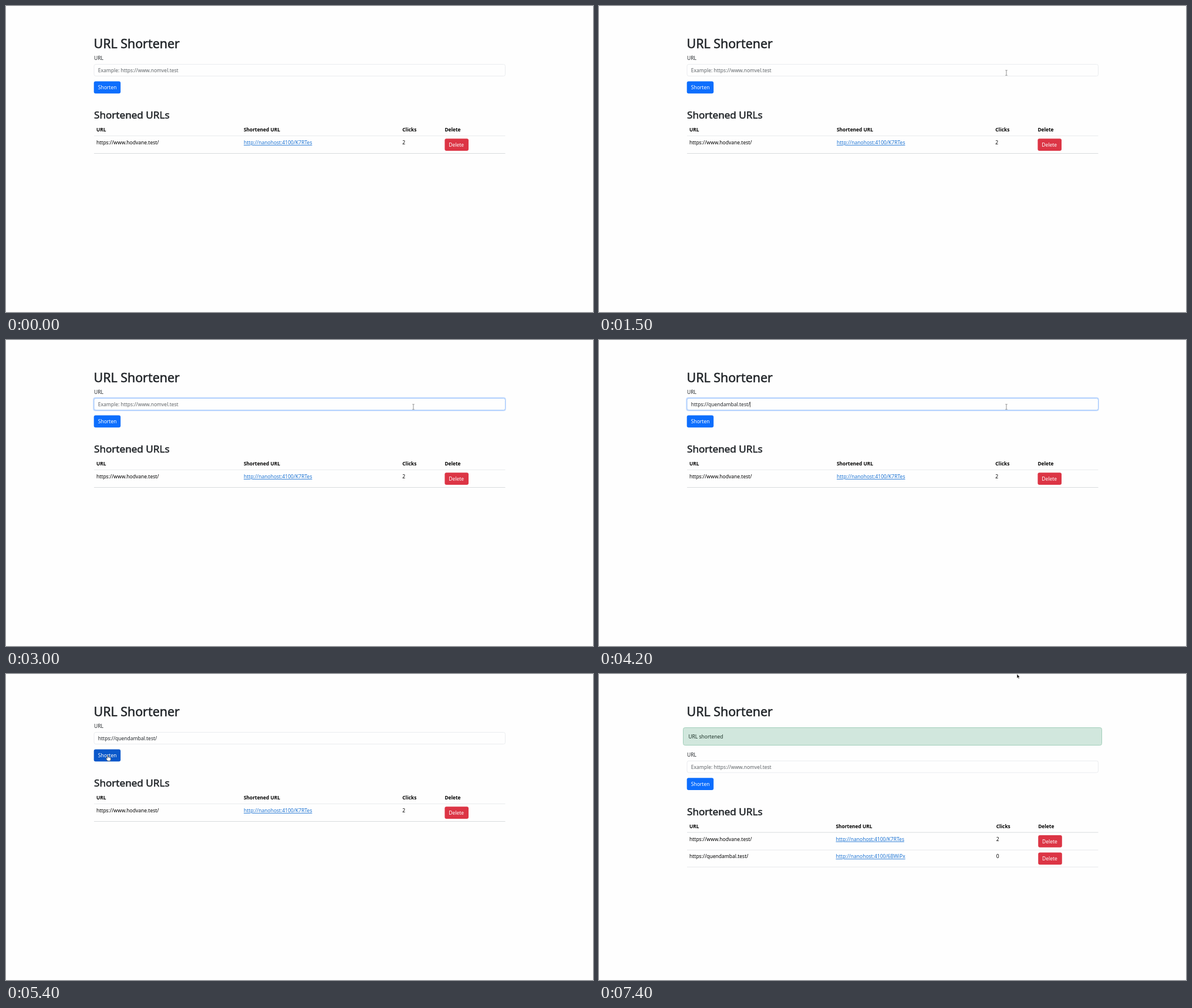
These frames come from a looping animation (1000 px wide and 522 px high, 8 s). An HTML page:

```html
<!DOCTYPE html>
<html lang="en">
<head>
<meta charset="utf-8">
<title>URL Shortener</title>
<style>
  html, body { margin: 0; width: 100%; height: 100%; overflow: hidden; background: #fefefe; }
  svg { display: block; width: 1000px; height: 522px; font: 8.5px "Noto Sans", "Open Sans", sans-serif; fill: #212529; }
  text { white-space: pre; }
  .h1, .h2 { stroke: #212529; stroke-width: .5px; }
  .h1 { font-size: 21.4px; }
  .h2 { font-size: 17.1px; }
  .th { font-size: 8.35px; font-weight: 700; fill: #000; }
  .td { fill: #000; }
  .link { fill: #1c73d3; text-decoration: underline; }
  .hint { fill: #5f6468; }
  .btn { fill: #fff; }
  .alert { fill: #1c3228; }
</style>
</head>
<body>
<svg id="stage" viewBox="0 0 1000 522"></svg>
<script>
const LOOP = 8000, STEP = 100;
const FOCUS = 2400, PASTE = 4100, BLUR = 5200, PRESS = 5300, SENT = 5600;
const TYPED = "https://quendambal.test/";
const stage = document.getElementById("stage");

const rows = [
  ["https://www.hodvane.test/", "http://nanohost:4100/K7RTes", 2],
  [TYPED, "http://nanohost:4100/6BWiPx", 0],
];

// Pointer stops: time, x, y, shape from then on
const stops = [
  [1000, 742, 66, "arrow"], [1200, 714, 92, "arrow"], [1300, 702, 105, "beam"], [1500, 694, 114, "beam"],
  [4200, 694, 114, "beam"], [4300, 688, 115, "beam"], [4500, 610, 118, "beam"], [4600, 400, 127, "arrow"],
  [4700, 215, 139, "arrow"], [4800, 174, 143, "hand"], [6900, 174, 143, "hand"],
  [7000, 520, 56, "arrow"], [7100, 711, 7, "arrow"], [7300, 711, 7, "arrow"], [7400, 712, 0, "arrow"],
];

const shapes = {
  arrow: `<path d="M0 0V7.2L1.7 5.7L2.9 8.3L4 7.8L2.9 5.3H5Z" fill="#111" stroke="#fff" stroke-width=".5"/>`,
  beam: `<path d="M-1.7-4.3H-.5Q0-4.3 0-3.8Q0-4.3.5-4.3H1.7M0-3.8V3.8M-1.7 4.3H-.5Q0 4.3 0 3.8Q0 4.3.5 4.3H1.7" fill="none" stroke="#777" stroke-width=".8"/>`,
  hand: `<path d="M-1.5 1.2V-3.6Q-.7-4.8.1-3.6V-.9Q1-1.6 1.7-.6Q2.5-1.2 3.1-.2Q4.2-.6 4.4.6V3L3.4 5.2H-1L-3.4 1.8Q-3.6.3-2.4.6Z" fill="#fff" stroke="#555" stroke-width=".8"/>`,
};

const clamp = v => Math.max(0, Math.min(1, v));
const mix = (a, b, k) => a + (b - a) * k;
const fade = (t, start) => clamp((t - start + 75) / 150);
const mixColor = (a, b, k) => `rgb(${a.map((v, i) => Math.round(mix(v, b[i], k)))})`;

const text = (x, y, s, cls = "") => `<text x="${x}" y="${y}" class="${cls}">${s}</text>`;
const box = (x, y, w, h, fill, stroke = "none", r = 3) =>
  `<rect x="${x}" y="${y}" width="${w}" height="${h}" rx="${r}" fill="${fill}" stroke="${stroke}"/>`;
const rule = (y, color) => `<path d="M150 ${y}H850.5" stroke="${color}"/>`;

function form(t, sent) {
  const glow = sent ? 0 : fade(t, FOCUS) * (1 - fade(t, BLUR));
  const hover = sent ? 0 : fade(t, 4800);
  const press = sent ? 0 : fade(t, PRESS);
  const color = press ? mixColor([11, 94, 215], [10, 88, 202], press)
                      : mixColor([13, 110, 253], [11, 94, 215], hover);
  const filled = t >= PASTE && !sent;
  return text(150, 92, "URL")
    + (glow ? box(148.3, 97.8, 703.4, 23.4, `rgba(13,110,253,${.25 * glow})`, "none", 4) : "")
    + box(150, 99.5, 700.5, 20, "#fefefe", mixColor([234, 236, 239], [165, 202, 252], glow))
    + (filled ? `<text id="field" x="156.8" y="113">${TYPED}</text>`
              : text(156.8, 113, "Example: https://www.nomvel.test", "hint"))
    + box(149.7, 128.5, 45.5, 20.8, color)
    + text(156.8, 142, "Shorten", "btn");
}

function table(sent) {
  const [link, clicks, del] = sent ? [403.5, 676.7, 748.2] : [405, 675.3, 747.4];
  let out = text(150, 192, "Shortened URLs", "h2")
    + text(154, 214, "URL", "th") + text(link, 214, "Shortened URL", "th")
    + text(clicks, 214, "Clicks", "th") + text(del, 214, "Delete", "th")
    + rule(221.5, sent ? "#d9dcdf" : "#e9ebed");
  rows.slice(0, sent ? 2 : 1).forEach(([url, short, count], i) => {
    const y = i * 29.6;
    out += text(154, 236 + y, url, "td") + text(link, 236 + y, short, "link")
      + text(clicks, 236 + y, count, "td")
      + box(del, 226.3 + y, 40.6, 20.7, "#dc3545")
      + text(del + 6.8, 240 + y, "Delete", "btn")
      + rule(251.5 + Math.floor(y), sent ? "#e6e8ea" : "#d9dbdd");
  });
  return out;
}

function pointer(t) {
  const i = stops.findLastIndex(s => s[0] <= t);
  if (i < 0) return "";
  const a = stops[i], b = stops[i + 1] || a;
  const k = b === a ? 0 : (t - a[0]) / (b[0] - a[0]);
  return `<g transform="translate(${mix(a[1], b[1], k)} ${mix(a[2], b[2], k)})">${shapes[a[3]]}</g>`;
}

function caret(t) {
  if (t < FOCUS || t >= BLUR) return "";
  const since = t - (t < PASTE ? FOCUS : PASTE + 200);
  if (since >= 0 && Math.floor(since / 600) % 2) return "";
  const field = document.getElementById("field");
  const x = 157 + (field ? field.getComputedTextLength() : 0);
  return `<path d="M${x} 105.5V114.5" stroke="#222" stroke-width=".8"/>`;
}

function draw(t) {
  const sent = t >= SENT;
  stage.innerHTML = text(149.5, 72.2, "URL Shortener", "h1")
    + (sent ? box(143.5, 91.5, 713, 30, "#d1e7dd", "#a3cfbb") + text(152.3, 109.5, "URL shortened", "alert") : "")
    + `<g transform="translate(0 ${sent ? 48.7 : 0})">${form(t, sent)}${table(sent)}</g>`;
  stage.insertAdjacentHTML("beforeend", caret(t) + pointer(t));
}

const begin = performance.now();
let last = -1;
function tick() {
  const t = Math.floor(((performance.now() - begin) % LOOP) / STEP) * STEP;
  if (t !== last) draw(last = t);
  requestAnimationFrame(tick);
}
tick();
</script>
</body>
</html>
```
